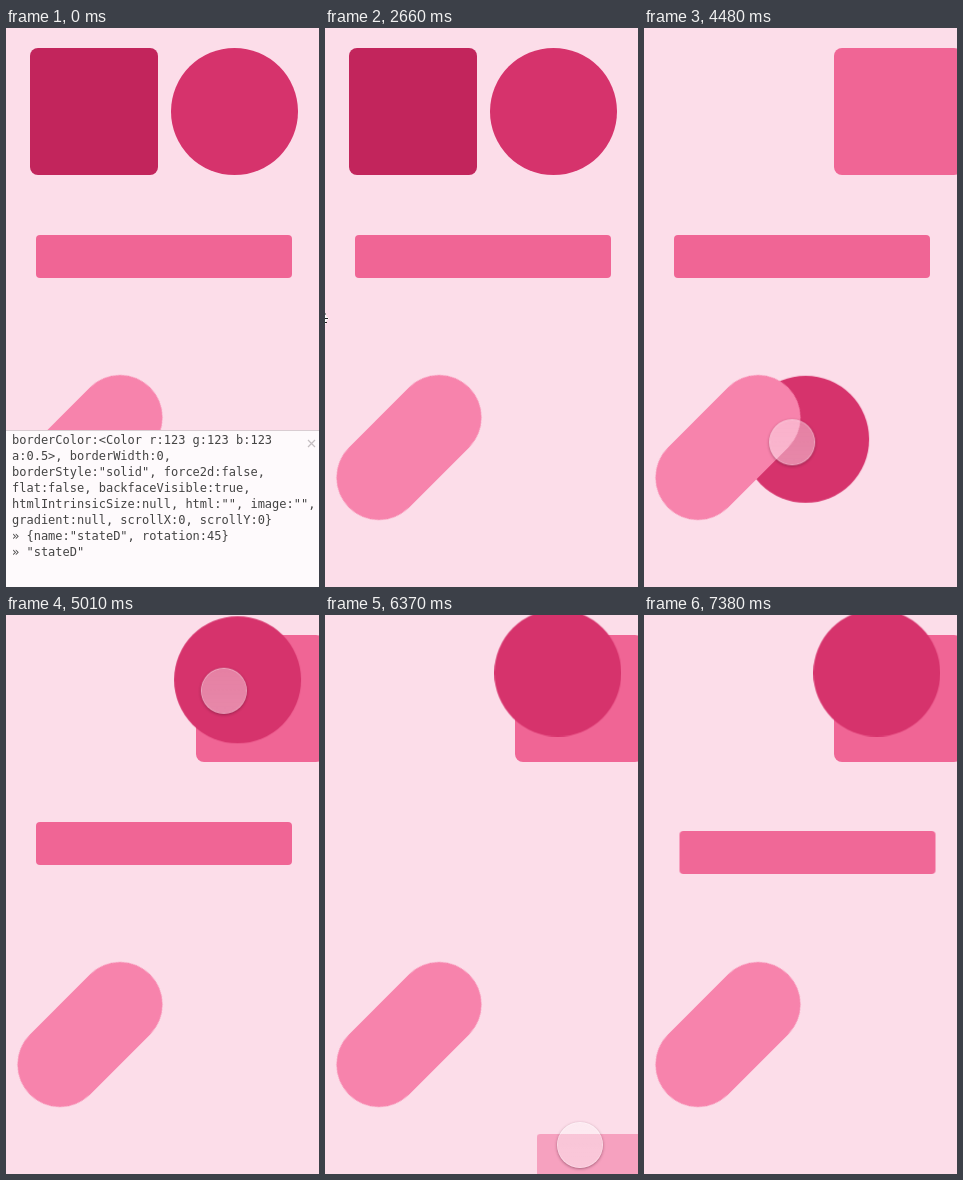
These frames come from a looping animation (313 px wide and 559 px high, 7.48 s). An HTML page:

```html
<!DOCTYPE html>
<html lang="en">
<head>
<meta charset="utf-8">
<title>Draggable layers</title>
<style>
  html, body { margin: 0; width: 100%; height: 100%; overflow: hidden; background: #fcdde9; }
  #stage { position: relative; width: 313px; height: 559px; overflow: hidden; background: #fcdde9; }
  #stage > * { position: absolute; }
  #square { left: 24px; top: 19.5px; width: 127.5px; height: 127.5px; border-radius: 8px; background: #c2255c; }
  #circle { left: 164.5px; top: 19.5px; width: 127.5px; height: 127.5px; border-radius: 50%; background: #d6336c; }
  #bar { left: 30px; top: 207px; width: 255.5px; height: 42.5px; border-radius: 4px; background: #f06595; }
  #pill { left: -1.5px; top: 377px; width: 170px; height: 85px; border-radius: 43px; background: #f783ac; transform: rotate(-45deg); }
  #console { left: 0; top: 402px; width: 313px; height: 157px; box-sizing: border-box;
    border-top: 1px solid #d9cdd2; background: #fefafc; color: #444; }
  #console pre { position: absolute; left: 6px; top: 1px; margin: 0; font: 12px/16px "DejaVu Sans Mono", monospace; }
  #console svg { position: absolute; left: 301px; top: 8px; }
  #touch { left: -23px; top: -23px; width: 46px; height: 46px; box-sizing: border-box; border-radius: 50%;
    border: 1px solid rgba(255,255,255,.6); box-shadow: 0 1px 3px rgba(70,20,40,.45);
    background: linear-gradient(rgba(255,255,255,.38), rgba(255,255,255,.42)) padding-box; }
  #arrow, #resize { left: 0; top: 0; }
  #resize { top: 285px; }
</style>
</head>
<body>
<div id="stage">
  <div id="square"></div>
  <div id="circle"></div>
  <div id="bar"></div>
  <div id="pill"></div>
  <div id="console">
    <pre>borderColor:&lt;Color r:123 g:123 b:123
a:0.5&gt;, borderWidth:0,
borderStyle:"solid", force2d:false,
flat:false, backfaceVisible:true,
htmlIntrinsicSize:null, html:"", image:"",
gradient:null, scrollX:0, scrollY:0}
» {name:"stateD", rotation:45}
» "stateD"</pre>
    <svg width="9" height="9"><path d="M1 1l7 7M8 1l-7 7" stroke="#c4bec1" stroke-width="1.2"/></svg>
  </div>
  <svg id="arrow" width="12" height="18"><path d="M.5 .5v14l3.3-3 2.2 5.3 2.3-1-2.2-5h4.6z" fill="#111" stroke="#fff"/></svg>
  <svg id="resize" width="4" height="11"><path d="M0 0h1v3l3 2.5-3 2.5v3h-1z" fill="#fff"/><path d="M0 1h1M0 5.5h3M0 9.5h2" stroke="#222"/></svg>
  <div id="touch"></div>
</div>
<script>
  const LOOP = 7480;
  const $ = id => document.getElementById(id);

  // Plays rows of [ms, value, easing] for one property, holding both ends.
  function play(id, prop, rows) {
    const last = rows[rows.length - 1];
    const all = [[0, rows[0][1]], ...rows, [LOOP, last[1]]];
    const frames = all.map(([ms, value, easing = 'linear']) =>
      ({ offset: ms / LOOP, [prop]: value, easing }));
    $(id).animate(frames, { duration: LOOP, iterations: Infinity });
  }

  const move = (id, rows) => play(id, 'transform',
    rows.map(([ms, x, y, easing]) => [ms, `translate(${x}px, ${y}px)`, easing]));

  const show = (id, from, to) => play(id, 'opacity',
    [[0, from ? 0 : 1], [from, from ? 0 : 1], [from, 1], [to, 1], [to, 0]]);

  const smooth = 'ease-in-out';
  const settle = 'cubic-bezier(.32,.1,.42,.9)';

  show('console', 0, 1340);
  show('arrow', 450, 1340);
  show('resize', 2660, 2690);
  show('touch', 1340, 6950);

  move('arrow', [[450, -10, 501, smooth], [1190, 303, 413]]);

  move('touch', [
    [1340, 305, 414], [1670, 305, 414, smooth], [2030, -30, 496],
    [2680, -30, 496], [2680, -30, 270], [2690, 5, 262, 'ease-out'],
    [2920, 85, 105], [2950, 85, 105, smooth], [3370, 251, 105, smooth],
    [3580, 215, 94], [3680, 215, 94, 'ease-in'],
    [4160, 150, 449, 'ease-out'], [4290, 136, 485, 'ease-in'],
    [4480, 148, 415], [4930, 213, 104, 'ease-out'], [5060, 219, 69, smooth],
    [5400, 74, 218], [5450, 74, 218, 'ease-in'],
    [5680, 87, 265], [5730, 117, 325], [5850, 240, 390],
    [6000, 255, 460, 'ease-out'], [6370, 255, 530], [6700, 255, 530, 'ease-in'],
    [6900, 340, 540]
  ]);

  move('square', [[2950, 0, 0, smooth], [3370, 166, 0]]);
  play('square', 'backgroundColor', [[2950, '#c2255c'], [3250, '#f06595']]);

  move('circle', [
    [3680, 0, 0, 'ease-in'], [4160, -65, 355, 'ease-out'], [4290, -79, 390.5, 'ease-in'],
    [4480, -67, 328.5], [4930, -2, 9.5, 'ease-out'], [5060, 4.3, -25.5]
  ]);

  move('bar', [
    [5450, 0, 0, 'ease-in'], [5680, 100, 70], [5730, 178.5, 116], [5850, 176, 168],
    [6000, 181, 242, 'ease-out'], [6370, 181.5, 312], [6740, 181.5, 312, settle],
    [7380, 5.5, 9]
  ]);
  play('bar', 'opacity', [[5450, 1], [5650, .5], [6740, .5, settle], [7380, .98]]);
</script>
</body>
</html>
```
